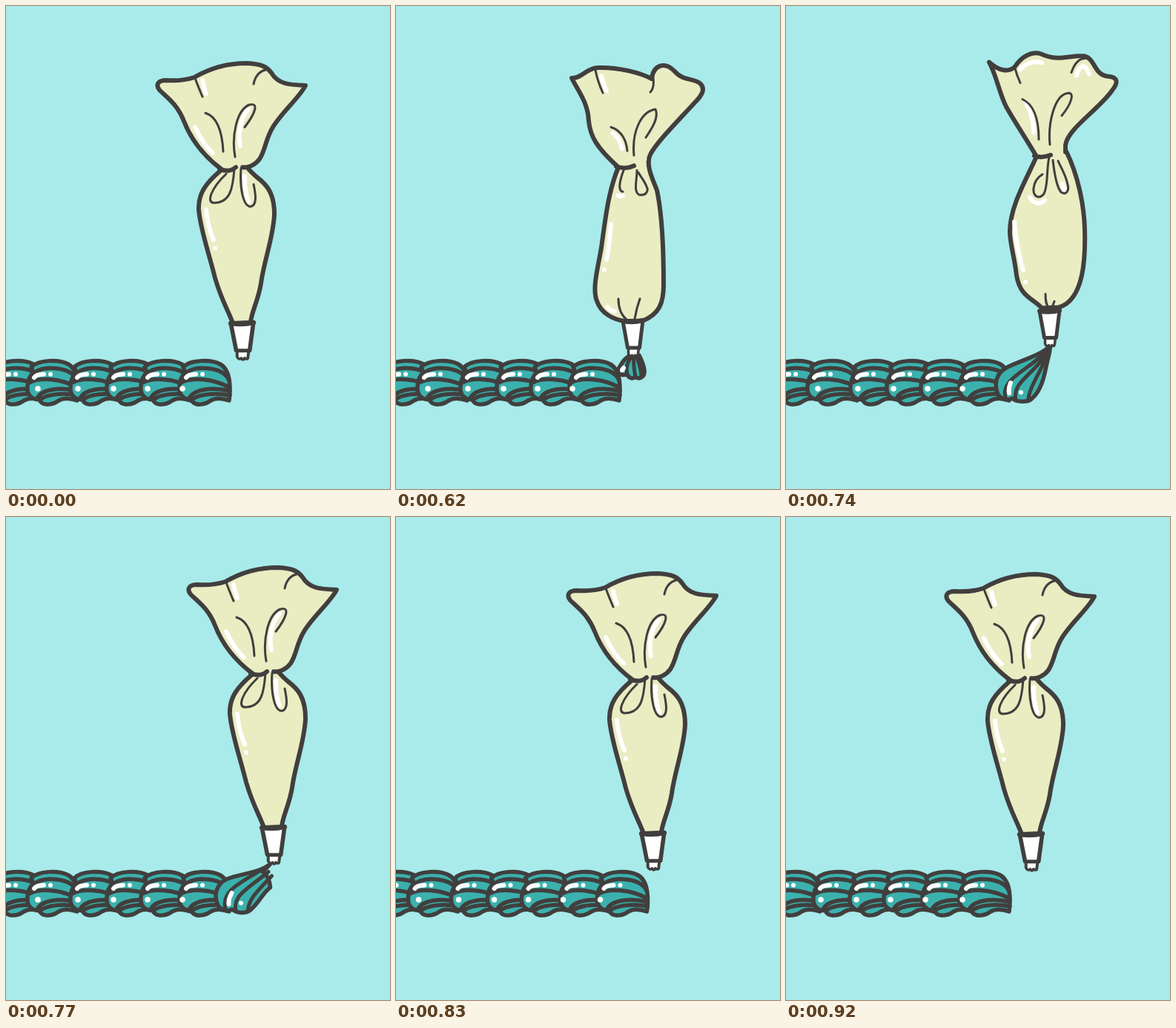
These frames come from a looping animation (518 by 650 pixels, 950 ms). An HTML page:

```html
<!DOCTYPE html>
<html lang="en">
<head>
<meta charset="utf-8">
<title>Piping bag</title>
<style>
  html, body { margin: 0; width: 100%; height: 100%; overflow: hidden; background: #a8ebea; }
  svg { display: block; width: 100%; height: 100%; }
  path { fill: none; stroke: #413f3e; stroke-width: 6; stroke-linecap: round; stroke-linejoin: round; }
  .bag { fill: #eaecc2; }
  .teal { fill: #3bb1ad; }
  .tip { fill: #fff; stroke-width: 3.5; }
  .cone { fill: #fff; stroke-width: 5; }
  .thin { stroke-width: 3; }
  .mid { stroke-width: 5.5; }
  .shine { stroke: #fff; }
</style>
</head>
<body>
<svg viewBox="0 0 518 650">
  <defs>
    <!-- one swirl, x = 0 at its highlight -->
    <g id="swirl">
      <path class="teal mid" d="M-12 486C-2 476 25 475 38 482C50 489 53 506 50 531C39 527 32 527 25 531C17 537 3 539 -1 530C-12 529 -18 523 -17 513C-17 504 -14 498 -9 493Z"/>
      <path class="mid" d="M-15 506C-12 490 5 485 24 488C38 490 47 496 50 504M-15 507C-2 500 25 500 50 513M-4 528C2 516 26 512 51 518M0 530C6 524 28 519 51 524"/>
      <path class="shine" d="M-8 500C-6 496.500 -1 495.500 5 495.500M14 495.500h.01"/>
    </g>
    <g id="nozzle">
      <path class="tip" d="M-6 36L-6 44Q-4 49 -1 46Q1 50 3 46Q7 49 7 44L8 36"/>
      <path class="cone" d="M-13.500 0L13.500 -1L9 36H-7Z"/>
      <path d="M-13.500 0Q0 3 13.500 -1"/>
    </g>
  </defs>

  <g id="rope"></g>

  <g id="cream">
    <path class="teal mid" id="body"/>
    <path id="ribs" style="stroke-width:5"/>
    <path class="shine" id="gloss"/>
  </g>

  <g id="rest">
    <path class="bag" d="M290 221C270 238 259 252 260 274C262 300 273 330 282 366C291 397 300 410 306 427L330 426C331 411 340 398 344 373C348 343 361 310 362 280C362 250 350 239 338 230Q331 224 325 217"/>
    <path class="bag" d="M291 220C264 200 249 178 240 155C231 132 217 123 207 113C201 105 206 100 216 100C231 101 242 100 254 96C278 82 300 77 325 77C345 78 352 82 358 90C367 105 381 106 404 107C396 123 372 143 360 163C350 179 350 194 342 206C336 214 327 218 319 217"/>
    <path d="M288 219C296 223 304 222 310 217"/>
    <path class="shine" d="M265 100C266 107 268 113 270 118M255 163C262 178 270 190 279 198M327 139C317 150 312 170 316 188M322 229C322 244 324 256 327 263M270 274C271 290 275 303 280 315M282 326h.01"/>
    <path class="thin" d="M255 97Q259 108 265 122M350 86C342 88 336 95 334 105M269 144C288 150 292 175 293 196M309 203C304 175 311 140 328 133C342 129 336 145 322 163M308 219C306 245 303 265 280 265C270 264 277 245 297 226M317 219C315 245 320 270 330 270C340 268 336 250 334 240"/>
    <use href="#nozzle" transform="translate(318.500 427) scale(1.130 1.020)"/>
  </g>

  <g id="squeeze">
    <path class="bag" d="M300 217C285 250 264 285 264 318C264 335 270 350 273 377C278 407 296 408 307 421L330 420C365 410 366 350 365 315C364 280 355 240 340 210"/>
    <path class="bag" d="M300 217C284 190 269 168 259 150C249 130 246 108 236 90C248 101 262 105 271 96C280 82 294 75 306 79C330 90 345 80 365 82C379 86 378 107 395 109C411 110 410 118 402 128C385 153 341 180 339 202V211"/>
    <path d="M297 216C305 219 314 217 319 215"/>
    <path class="shine" d="M278 100C285 91 297 88 307 91M354 108C356 97 363 93 367 98L371 106M285 143C292 155 296 170 296 185M291 272C296 281 305 282 311 276M335 254L337 262M270 305C272 330 276 350 282 370M285 386h.01"/>
    <path class="thin" d="M270 95Q273 107 278 118M366 85C356 85 350 95 347 104M281 140C298 148 303 170 303 194M318 201C315 170 325 135 341 132C352 129 348 145 334 162M317 218C313 235 316 255 310 267C303 276 295 270 296 260C297 250 303 244 308 241M322 222C324 240 327 258 333 265C341 270 344 262 342 255C340 243 333 232 329 223M312 402C312 412 313 417 317 422M324 412L320 422"/>
    <use href="#nozzle" transform="translate(317.500 425)"/>
  </g>

  <g id="press">
    <path class="bag" d="M300 217C286 250 282 290 277 325C273 350 264 380 271 397C277 415 295 422 308 424L332 424C355 415 361 400 361 375C361 330 359 280 352 248C345 230 339 218 341 204"/>
    <path class="bag" d="M300 217C270 190 262 175 260 155C259 130 246 115 237 97C250 98 258 83 272 83C300 82 330 90 345 98C347 80 362 74 375 87C388 102 400 96 410 104C419 112 411 122 403 130C380 155 350 185 343 200Q341 204 341 208"/>
    <path d="M297 216C306 219 315 218 321 215"/>
    <path class="shine" d="M277 94C279 102 281 108 284 114M292 171C299 175 303 183 305 192M299 255Q303 257 306 255M290 294C288 312 288 325 284 341M281 355h.01M285 405Q289 410 295 411"/>
    <path class="thin" d="M269 86C271 98 275 108 279 117M347 97C348 105 347 112 343 116M290 163C305 168 311 182 312 195M321 201C318 170 330 142 350 139C355 150 345 165 337 177M307 221C303 232 298 248 306 250M325 221C325 235 320 250 328 254C338 256 341 248 338 243C335 235 330 230 327 224M300 394C300 408 304 416 311 422M329 394C325 405 323 415 322 421"/>
    <use href="#nozzle" transform="translate(319.500 424)"/>
  </g>
</svg>
<script>
const el = id => document.getElementById(id);
const LOOP = 950, HOLD = 530, STEP = 30;

// cream outline, ribs and gloss: blob, stretched fan, settled curl
const shapes = {
  body: [
    'M318 469C310 472 306 478 302 485C298 490 298 496 304 496C308 497 311 496 312 496C315 502 320 502 323 499C328 503 336 500 335 490C334 482 331 476 328 470C325 469 322 468 318 469Z',
    'M357 457C342 472 312 478 297 487C284 494 280 508 286 523C292 531 300 531 305 528C312 534 326 533 331 529C344 518 348 500 351 485C353 476 354 472 355 468C356 464 356 460 357 457Z',
    'M355 478C340 487 318 482 300 487C286 491 278 508 286 523C292 531 300 531 305 528C312 534 322 534 328 529C338 522 345 511 362 512C358 498 350 490 337 486C343 485 350 482 355 478Z'],
  ribs: [
    'M312 496C309 485 314 476 319 470M323 499C321 488 320 478 321 470M331 499C331 488 327 478 324 470',
    'M296 527C289 500 330 490 356 460M310 530C304 505 338 495 356 460M327 529C328 512 346 490 356 460',
    'M296 527C290 505 308 492 338 487M310 529C306 512 325 498 352 495M326 529C325 515 345 504 361 506'],
  gloss: [
    'M305 490C305 489 306 488 307 487M306 489L306 489',
    'M301 521C300 516 301 512 303 507M317 520L317 520',
    'M300 521C300 516 302 510 306 505M317 519L317 519']
};

// highlight x of each swirl and its small dot's offset; the last is the new one
const swirls = [[-51, -8], [-1, -8], [46, -3], [104, -7], [153, -8], [199, -8], [251, -13], [301, -13]];

// pose, bag x, bag y, cream stage (4 = swirl finished), rope x
const steps = [
  ['rest', 0, 0, 0, 0],
  ['squeeze', 0, 0, 0, 0],
  ['squeeze', 1, -1, 0, 0],
  ['press', 0, 0, .5, 0],
  ['press', 0, 0, 1, 0],
  ['press', 9, -3, 1.25, 0],
  ['press', 18, -6.5, 1.5, 0],
  ['squeeze', 29, -11, 1.75, 0],
  ['squeeze', 38, -14.5, 2, 0],
  ['rest', 42, -9, 2.5, 0],
  ['rest', 44.5, -3, 3, 0],
  ['rest', 28, -1, 4, -12.5],
  ['rest', 12, 0, 4, -25],
  ['rest', 12, 0, 4, -37.5],
  ['rest', 12, 0, 4, -50]
];

el('rope').innerHTML = swirls.map(([x, dot]) =>
  `<g transform="translate(${x})"><use href="#swirl"/><path class="shine" style="stroke-width:7.5" d="M${dot} 515h.01"/></g>`).join('');
const fresh = el('rope').lastChild;

function mix(a, b, k) {
  const to = b.match(/[\d.]+/g);
  let i = 0;
  return a.replace(/[\d.]+/g, n => +n + (to[i++] - n) * k);
}

function drawCream(stage) {
  const cream = el('cream');
  cream.style.display = stage > 0 && stage < 4 ? '' : 'none';
  const size = Math.min(stage, 1);
  cream.setAttribute('transform', `translate(320 470) scale(${size}) translate(-320 -470)`);
  const p = Math.min(Math.max(stage - 1, 0), 2), i = Math.min(Math.floor(p), 1);
  for (const id in shapes) el(id).setAttribute('d', mix(shapes[id][i], shapes[id][i + 1], p - i));
}

let shown = -1;
function draw(time) {
  const t = time % LOOP;
  const n = t < HOLD ? 0 : Math.min(1 + Math.floor((t - HOLD) / STEP), steps.length - 1);
  if (n === shown) return;
  shown = n;
  const [pose, x, y, stage, shift] = steps[n];
  for (const id of ['rest', 'squeeze', 'press']) el(id).style.display = id === pose ? '' : 'none';
  el(pose).setAttribute('transform', `translate(${x} ${y})`);
  el('rope').setAttribute('transform', `translate(${shift})`);
  fresh.style.display = stage === 4 ? '' : 'none';
  drawCream(stage);
}

const start = performance.now();
function tick() {
  draw(performance.now() - start);
  requestAnimationFrame(tick);
}
tick();
</script>
</body>
</html>
```
